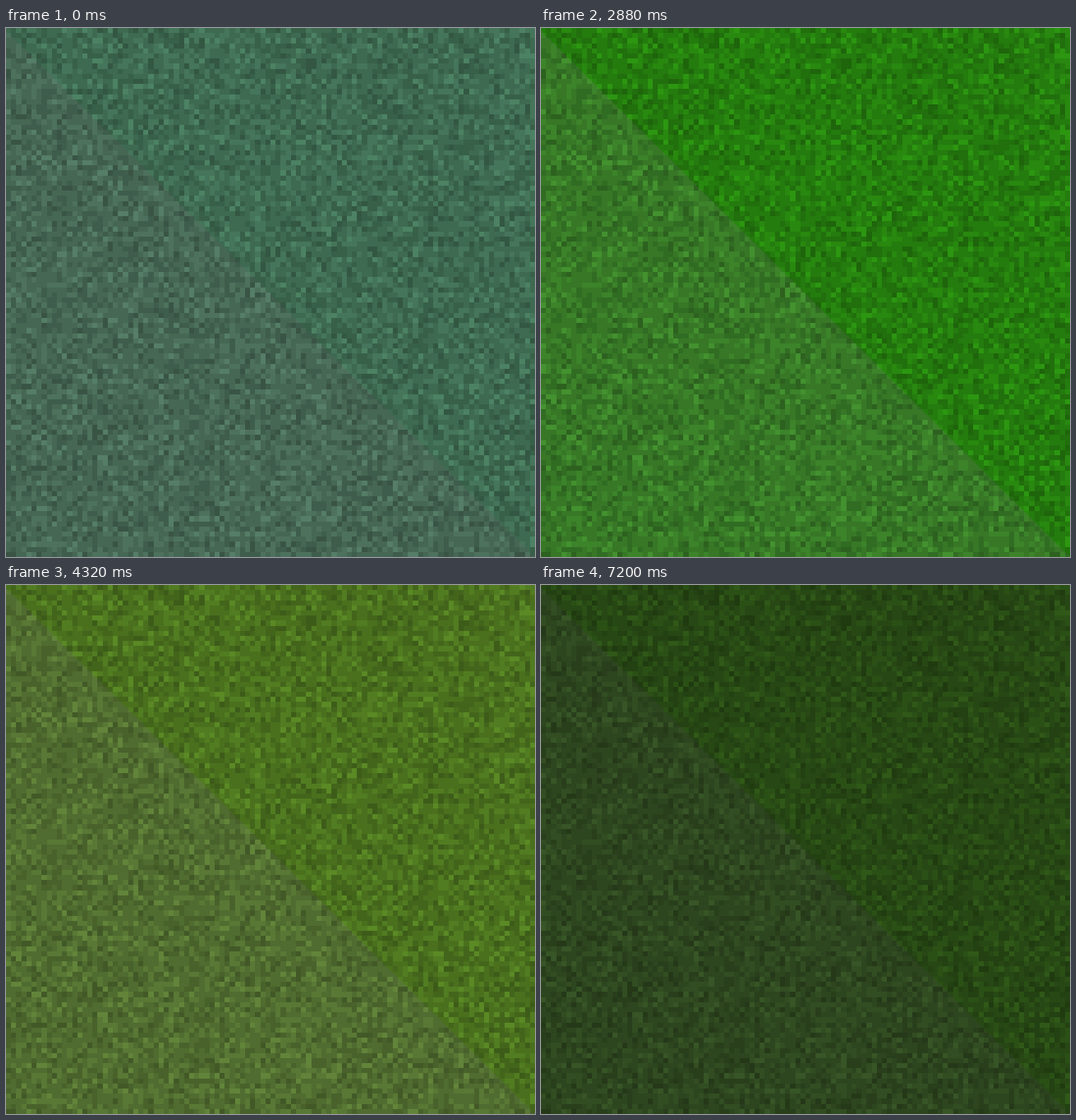
Animation of 748x748 px, one loop 8640 ms. Source, as an HTML page with a canvas:

```html
<!DOCTYPE html>
<html lang="en">
<head>
<meta charset="utf-8">
<title>Green noise</title>
<style>
  html, body { margin: 0; width: 100%; height: 100%; overflow: hidden; background: #3e6a51; }
  canvas { display: block; width: 748px; height: 748px; }
</style>
</head>
<body>
<canvas id="stage" width="748" height="748"></canvas>
<script>
const SIZE = 748, CELLS = 104, STEP = 1440, LEVELS = 5;
const ctx = document.getElementById('stage').getContext('2d');
const tones = ['#3e6a51', '#426b40', '#247b0e', '#4a701e', '#706b19', '#274814'];

let seed = 20731;
function random() {
  seed = (Math.imul(seed, 1664525) + 1013904223) >>> 0;
  return seed / 2 ** 32;
}

// One path per brightness level; middle levels are the most common
const paths = Array.from({ length: LEVELS }, () => new Path2D());
const edge = i => Math.round(i * SIZE / CELLS);
for (let row = 0; row < CELLS; row++) {
  for (let col = 0; col < CELLS; col++) {
    const level = Math.floor((random() + random()) / 2 * LEVELS);
    const x = edge(col), y = edge(row);
    paths[level].rect(x, y, edge(col + 1) - x, edge(row + 1) - y);
  }
}

const lowerHalf = new Path2D(`M0 4L${SIZE} ${SIZE}H0Z`);

const parse = hex => [1, 3, 5].map(i => parseInt(hex.slice(i, i + 2), 16));

function mute(color) {
  const gray = Math.max(...color) * 0.87;
  return color.map(c => c + (gray - c) * 0.26);
}

function fillNoise(color) {
  paths.forEach((path, level) => {
    const brightness = 0.82 * 1.105 ** level;
    ctx.fillStyle = `rgb(${color.map(c => Math.round(c * brightness)).join(',')})`;
    ctx.fill(path);
  });
}

function draw(color) {
  fillNoise(color);
  ctx.save();
  ctx.clip(lowerHalf);
  fillNoise(mute(color));
  ctx.restore();
}

const start = performance.now();
let shown = -1;
function tick() {
  const step = Math.floor((performance.now() - start) / STEP) % tones.length;
  if (step !== shown) draw(parse(tones[shown = step]));
  requestAnimationFrame(tick);
}
tick();
</script>
</body>
</html>
```
